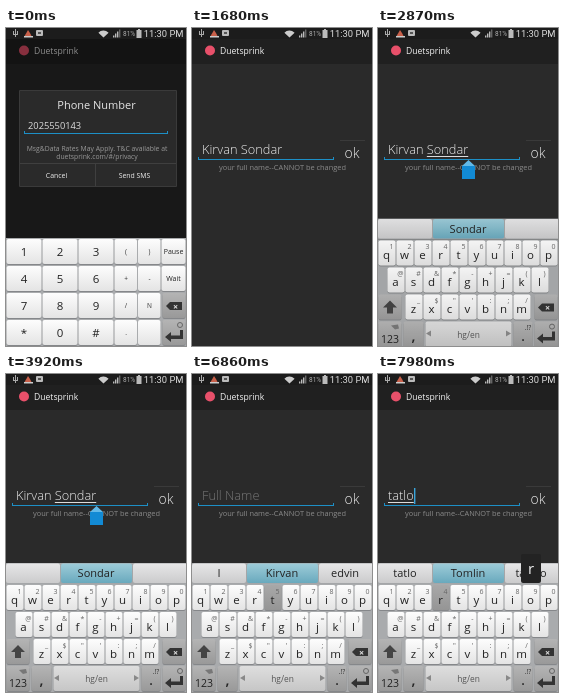
These frames come from a looping animation (180 px wide and 318 px high, 8000 ms). An HTML page with a canvas:

```html
<!DOCTYPE html>
<html lang="en">
<head>
<meta charset="utf-8">
<style>
html, body { margin: 0; width: 100%; height: 100%; overflow: hidden; background: #2a2a2a; }
canvas { display: block; width: 180px; height: 318px; }
</style>
</head>
<body>
<canvas id="stage" width="180" height="318"></canvas>
<script>
const ctx = document.getElementById('stage').getContext('2d');
const LOOP = 8000, STEP = 70;
const BACK = '#2a2a2a', BLUE = '#1d8fc6';
const FIRST = 'Kirvan ', LAST = 'Sondar';
const ROWS = ['qwertyuiop', 'asdfghjkl', 'zxcvbnm'];
const HINTS = ['1234567890', '@#&*-+=()', '_$"\':;/'];
const ROW_X = [0, 9, 27], ROW_Y = [211, 238, 265, 292];
const PRESSES = [['t', 6860], ['a', 7070], ['t', 7280], ['l', 7560], ['o', 7770], ['r', 7980]];
const CURSOR_ON = [[770, 1540], [2100, 2800], [3360, 3920], [4480, 5600], [6160, 6790], [6930, 8000]];
const WORDS = [
  ['I', 'Kirvan', 'edvin'], ['t', 'to', 'the'], ['ta', 'take', 'tap'],
  ['tat', 'that', 'tattoo'], ['tatl', 'total', 'tattle'], ['tatlo', 'Tomlin', 'tattoo']
];

const clamp = v => Math.max(0, Math.min(1, v));
const within = (t, a, b) => t >= a && t < b;

function rect(x, y, w, h, fill) {
  ctx.fillStyle = fill;
  ctx.fillRect(x, y, w, h);
}

function round(x, y, w, h, r, fill) {
  ctx.fillStyle = fill;
  ctx.beginPath();
  ctx.roundRect(x, y, w, h, r);
  ctx.fill();
}

function poly(points, fill) {
  ctx.fillStyle = fill;
  ctx.beginPath();
  for (let i = 0; i < points.length; i += 2) ctx.lineTo(points[i], points[i + 1]);
  ctx.fill();
}

function text(s, x, y, size, fill, align = 'left', weight = 400, family = '"Open Sans", "Noto Sans"') {
  ctx.font = `${weight} ${size}px ${family}, sans-serif`;
  ctx.textAlign = align;
  ctx.fillStyle = fill;
  ctx.fillText(s, x, y);
}

function gradient(y, h, top, bottom) {
  const g = ctx.createLinearGradient(0, y, 0, y + h);
  g.addColorStop(0, top);
  g.addColorStop(1, bottom);
  return g;
}

function layer(alpha, draw) {
  if (alpha <= 0) return;
  ctx.save();
  ctx.globalAlpha = alpha;
  draw();
  ctx.restore();
}

// Keyboards sit on the plain background, so a veil over them acts as a fade.
function keyboard(alpha, dy, top, draw) {
  if (alpha <= 0) return;
  ctx.save();
  ctx.translate(0, dy);
  draw();
  ctx.globalAlpha = 1 - alpha;
  rect(0, top, 180, 318 - top, BACK);
  ctx.restore();
}

function inputLine(x, y, w) {
  rect(x, y, w, 1, BLUE);
  rect(x, y - 2, 1, 2, BLUE);
  rect(x + w - 1, y - 2, 1, 2, BLUE);
}

function statusBar() {
  rect(0, 0, 180, 11, '#1c1c1c');
  rect(9, 1, 1, 8, '#aaa');
  rect(7, 3, 1, 3, '#aaa');
  rect(11, 3, 1, 3, '#aaa');
  rect(7, 6, 5, 1, '#aaa');
  poly([18, 9, 22, 2, 24, 5, 26, 9], '#c9604a');
  rect(18, 8, 9, 1.5, '#ccc');
  round(30, 2, 7, 6, 1, '#bbb');
  rect(32, 4, 3, 2, '#555');
  ctx.fillStyle = '#ccc';
  ctx.beginPath();
  ctx.moveTo(97.5, 9.5);
  ctx.arc(97.5, 9.5, 7, -Math.PI * .76, -Math.PI * .24);
  ctx.fill();
  for (let i = 0; i < 4; i++) rect(107 + i * 2, 7.5 - i * 2, 1.4, 2 + i * 2, i < 3 ? '#bbb' : '#666');
  text('81%', 117, 8, 6.5, '#aaa', 'left', 400, 'Roboto');
  rect(132, 1, 2, 1, '#bbb');
  rect(130.5, 2, 5, 8, '#bbb');
  text('11:30 PM', 177.5, 9, 9.4, '#ddd', 'right', 400, 'Roboto');
}

function actionBar() {
  rect(0, 11, 180, 25, '#202020');
  ctx.fillStyle = '#e8506a';
  ctx.beginPath();
  ctx.arc(18, 22.5, 5, 0, 7);
  ctx.fill();
  text('Duetsprink', 28, 26, 8.6, '#f2f2f2', 'left', 500);
}

function dialog() {
  round(13, 62, 158, 97, 1, '#3a3a3a');
  rect(14, 63, 156, 95, BACK);
  text('Phone Number', 90.5, 81, 11, '#e4e4e4', 'center');
  text('2025550143', 22, 101, 9.3, '#dedede');
  inputLine(18, 105, 144);
  text('Msg&Data Rates May Apply. T&C available at', 91, 123, 6.8, '#999', 'center');
  text('duetsprink.com/#/privacy', 91, 130.5, 6.8, '#999', 'center');
  rect(14, 135, 156, 1, '#3f3f3f');
  rect(89, 135, 1, 23, '#3f3f3f');
  text('Cancel', 50.5, 150, 6.9, '#eee', 'center');
  text('Send SMS', 128.5, 150, 6.9, '#eee', 'center');
}

const charsTyped = t => PRESSES.filter(p => t >= p[1] + 140).length;

function fieldValue(t) {
  if (t < 4760) return FIRST + LAST;
  const removed = Math.min(6, Math.floor((t - 4760) / STEP) + 1)
    + Math.max(0, Math.floor((t - 6160) / STEP) + 1);
  if (removed < 13) return (FIRST + LAST).slice(0, 13 - removed);
  return PRESSES.slice(0, charsTyped(t)).map(p => p[0]).join('');
}

function selectionHandle() {
  rect(84, 138, 13, 13, '#128ad4');
  poly([90.5, 132, 97, 138, 84, 138], '#62b9e8');
}

function nameField(t) {
  const value = fieldValue(t);
  text('your full name--CANNOT be changed', 90.5, 142, 7.4, '#8b8b8b', 'center');
  rect(148, 112, 25, 1, '#3a3a3a');
  text('ok', 160, 130, 14, '#e8e8e8', 'center', 300);
  inputLine(6, 131, 136);
  text(value || 'Full Name', 10, 126, 12.8, value ? '#eee' : '#777', 'left', 300);

  const end = 10 + ctx.measureText(value).width;
  const composing = within(t, 2310, 5110) || t >= 6930;
  if (composing && value) {
    const start = t < 6000 ? 10 + ctx.measureText(FIRST).width : 10;
    if (end > start) rect(start, 128, end - start, 1, '#ddd');
  }
  if (CURSOR_ON.some(([a, b]) => within(t, a, b)))
    rect(t < 2100 ? 10 : Math.round(end), 114, 1.4, 16, '#39a5db');

  layer(t < 2310 ? 0 : 1 - clamp((t - 5110) / 260), selectionHandle);
}

function key(x, y, w, tone = 'light') {
  const [top, bottom] = {
    light: ['#fdfdfd', '#e4e4e4'], grey: ['#b4b4b4', '#999'],
    space: ['#dedede', '#c6c6c6'], down: ['#a8a8a8', '#959595'], blue: ['#8cc0d0', '#5b9fb5']
  }[tone];
  round(x + .5, y + 1, w - 1, 25, 2, '#85878a');
  round(x + .5, y, w - 1, 25, 2, gradient(y, 25, top, bottom));
}

function backspaceKey(tone) {
  key(156, 265, 24, tone);
  poly([160, 278, 164, 274, 176, 274, 176, 282, 164, 282], '#333');
  text('×', 169.5, 281.5, 9, '#ddd', 'center', 700);
}

function enterKey() {
  key(156, 292, 24, 'grey');
  poly([159, 309, 165, 304, 165, 307.5, 174, 307.5, 174, 302, 177, 302, 177, 311, 165, 311, 165, 314], '#333');
  ctx.strokeStyle = '#666';
  ctx.lineWidth = 1;
  ctx.beginPath();
  ctx.arc(174, 297, 2.5, 0, 7);
  ctx.stroke();
}

function numberPad() {
  rect(0, 210, 180, 108, '#a9abad');
  ['123', '456', '789', '*0#'].forEach((row, r) => {
    const y = ROW_Y[r];
    [...row].forEach((c, i) => {
      key(i * 36, y, 36);
      text(c, 18 + i * 36, y + 17, 11.5, '#222', 'center');
    });
    [...['()', '+-', '/N', '. '][r]].forEach((c, i) => {
      key(108 + i * 23.5, y, 23.5);
      text(c, 120 + i * 23.5, y + 15, 6.5, '#333', 'center');
    });
    if (r < 2) {
      key(155, y, 25);
      text(['Pause', 'Wait'][r], 167.5, y + 15, 7, '#222', 'center');
    }
  });
  backspaceKey('grey');
  enterKey();
}

function suggestions(t) {
  const words = t < 6160 ? ['', LAST, ''] : t < 6720 ? ['', FIRST.trim(), ''] : WORDS[charsTyped(t)];
  rect(0, 189, 180, 21, '#a4a6a8');
  [0, 55, 127].forEach((x, i) => {
    const fill = i === 1 ? gradient(190, 19, '#9ccbd8', '#69a9bd') : gradient(190, 19, '#e6e6e7', '#cbcbcc');
    round(x, 189.5, i === 1 ? 71 : 54, 19.5, 2, fill);
    text(words[i], [27, 90, 153][i], 203, 11, '#222', 'center');
  });
}

function keyBox(c) {
  const r = ROWS.findIndex(row => row.includes(c));
  return { x: ROW_X[r] + ROWS[r].indexOf(c) * 18, y: ROW_Y[r] };
}

function qwerty(t) {
  rect(0, 210, 180, 108, '#a9abad');
  suggestions(t);
  const down = PRESSES.find(p => within(t, p[1], p[1] + 140));
  ROWS.forEach((row, r) => [...row].forEach((c, i) => {
    const { x, y } = keyBox(c);
    key(x, y, 18, down && down[0] === c ? 'down' : 'light');
    text(c, x + 8.5, y + 18.5, 11.5, '#222', 'center');
    text(HINTS[r][i], x + 13.5, y + 8.5, 7, '#666', 'center');
  }));

  key(0, 265, 24, 'grey');
  poly([12, 271, 19, 278, 15, 278, 15, 284, 9, 284, 9, 278, 5, 278], '#444');
  const deleting = within(t, 4760, 5390) || within(t, 5880, 6650);
  backspaceKey(deleting ? 'blue' : 'grey');

  key(0, 292, 24, 'grey');
  text('123', 12, 313, 10.5, '#222', 'center');
  poly([13, 296, 20, 295, 21, 299, 17, 300], '#777');
  key(25, 292, 21, 'grey');
  text(',', 35.5, 311, 15, '#222', 'center', 600);
  key(47, 292, 87, 'space');
  text('hg/en', 90.5, 308, 8.4, '#555', 'center');
  poly([48, 304, 53, 301, 53, 307], '#888');
  poly([133, 304, 128, 301, 128, 307], '#888');
  key(135, 292, 20, 'grey');
  text('.!?', 150, 300, 7, '#333', 'center');
  text('.', 145, 311, 13, '#222', 'center', 600);
  enterKey();

  const popup = PRESSES.filter(p => within(t, p[1] + 70, p[1] + 280)).pop();
  if (popup) {
    const { x, y } = keyBox(popup[0]);
    const left = Math.max(0, x - 1);
    round(left, y - 31, 20, 29, 2, '#232323');
    text((down || popup)[0], left + 10, y - 11, 15, '#f2f2f2', 'center');
  }
}

function draw(t) {
  const dialogAlpha = 1 - clamp((t - 350) / 280);
  const dim = .42 * (1 - clamp((t - 350) / 420));
  rect(0, 0, 180, 318, BACK);
  actionBar();
  layer(1 - dialogAlpha, () => nameField(t));
  rect(0, 11, 180, 307, `rgba(0,0,0,${dim})`);
  layer(dialogAlpha, dialog);

  const hide = clamp((t - 980) / 140);
  keyboard(1 - hide, 80 * hide, 210, numberPad);
  if (t >= 2660) {
    const rest = (1 - clamp((t - 2590) / 350)) ** 2;
    keyboard(1 - rest, 40 * rest, 189, () => qwerty(t));
  }
  statusBar();
}

function loop(now) {
  draw(Math.floor((now % LOOP) / STEP) * STEP);
  requestAnimationFrame(loop);
}
requestAnimationFrame(loop);
</script>
</body>
</html>
```
